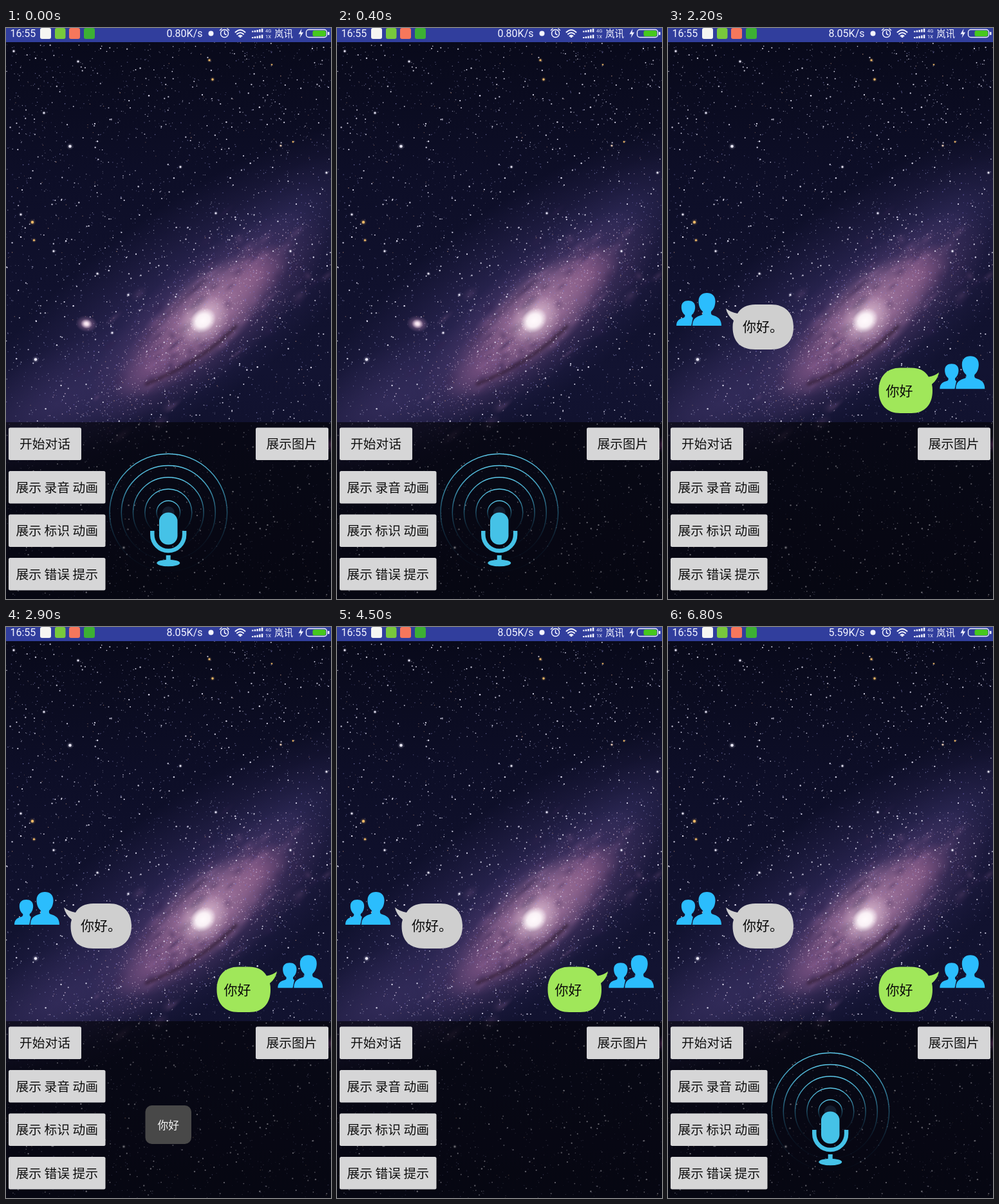
An HTML page with a canvas that plays this animation: 505x888 px, repeating every 8 s.

```html
<!DOCTYPE html>
<html lang="zh-CN">
<head>
<meta charset="utf-8">
<title>语音对话</title>
<style>
  html, body { margin: 0; width: 100%; height: 100%; overflow: hidden; background: #07081a; }
  canvas, svg { position: absolute; left: 0; top: 0; width: 505px; height: 888px; display: block; }
  text { font-family: Roboto, "Noto Sans CJK SC", "Noto Sans SC", "Noto Sans CJK", sans-serif; white-space: pre; }
  .cjk text { font-family: "Noto Sans CJK SC", "Noto Sans SC", "Noto Sans CJK", sans-serif; }
  .status text { fill: #f4f5ff; font-size: 16px; }
  .buttons rect { fill: #d6d6d7; }
  .buttons text { font-size: 19.8px; fill: #101010; text-anchor: middle; }
  .chat text { font-size: 21px; fill: #080808; }
  .people { fill: #2bbdfd; }
  .rings circle { fill: none; stroke: url(#ringFade); stroke-width: 1.5; }

  .mic, .chat, .speed { animation: 8s step-end infinite; }
  .mic { animation-name: mic; }
  .chat { animation-name: chat; }
  .s1 { animation-name: s1; }
  .s2 { animation-name: s2; }
  .s3 { animation-name: s3; }
  .toast { animation: toast 8s infinite; }

  @keyframes mic { 0% { opacity: 1 } 27.5% { opacity: 0 } 63.75%, 100% { opacity: 1 } }
  @keyframes chat { 0% { opacity: 0 } 27.5%, 100% { opacity: 1 } }
  @keyframes s1 { 0% { opacity: 1 } 17.5%, 100% { opacity: 0 } }
  @keyframes s2 { 0% { opacity: 0 } 17.5% { opacity: 1 } 70%, 100% { opacity: 0 } }
  @keyframes s3 { 0% { opacity: 0 } 70%, 100% { opacity: 1 } }
  @keyframes toast {
    0% { opacity: 0; animation-timing-function: step-end }
    28.75% { opacity: 0; animation-timing-function: steps(5, start) }
    35% { opacity: 1; animation-timing-function: step-end }
    51.25% { opacity: 1; animation-timing-function: steps(5, start) }
    57.5%, 100% { opacity: 0 }
  }
</style>
</head>
<body>
<canvas id="sky" width="505" height="888"></canvas>
<svg viewBox="0 0 505 888">
  <defs>
    <linearGradient id="ringFade" x1="0" y1="0" x2="0" y2="1">
      <stop offset="0" stop-color="#5cc8e8"/>
      <stop offset=".25" stop-color="#4cb8da" stop-opacity=".8"/>
      <stop offset=".55" stop-color="#3a9cc0" stop-opacity=".38"/>
      <stop offset=".8" stop-color="#2c7c9c" stop-opacity=".1"/>
      <stop offset="1" stop-color="#2c7c9c" stop-opacity=".03"/>
    </linearGradient>
    <clipPath id="behind"><path d="M0 400H46V446L39 450L36 464H0Z"/></clipPath>
    <path id="person" d="M38 463C38 452 44 449 52 446.5C54 445.5 54.5 444 54 441C49 437 47.5 430 47.5 425C47.5 416 53 412 60.5 412C68 412 73.5 416 73.5 425C73.5 430 72 437 67 441C66.5 444 67 445.5 69 446.5C77 449 83 452 83 463Z"/>
    <g id="pair" class="people">
      <g clip-path="url(#behind)"><use href="#person" transform="translate(31.5 463) scale(.82 .765) translate(-60.5 -463)"/></g>
      <use href="#person"/>
    </g>
  </defs>

  <g class="status">
    <rect width="505" height="22" fill="#313e9d"/>
    <text x="6.5" y="14">16:55</text>
    <rect x="53" y="0" width="17" height="17" rx="3" fill="#f6f6f2"/>
    <rect x="76" y="0" width="16.5" height="17" rx="3" fill="#78c83c"/>
    <rect x="98" y="0" width="17" height="17" rx="3" fill="#f6775c"/>
    <rect x="121" y="0" width="17" height="17" rx="3" fill="#3cb034"/>
    <g text-anchor="end">
      <text class="speed s1" x="305.5" y="14">0.80K/s</text>
      <text class="speed s2" x="305.5" y="14">8.05K/s</text>
      <text class="speed s3" x="305.5" y="14">5.59K/s</text>
    </g>
    <circle cx="318.5" cy="8.5" r="4" fill="#f4f5ff"/>
    <g fill="none" stroke="#f4f5ff" stroke-width="1.5" stroke-linecap="round">
      <circle cx="339.5" cy="8.5" r="6"/>
      <path d="M339.5 5V9L342 10.5M332.5 3.5L335 1.2M346.5 3.5L344 1.2"/>
      <path stroke-width="1.9" d="M356.5 6.5Q364 -.5 371.5 6.5M359 9.5Q364 5 369 9.5M361.5 12.5Q364 10.5 366.5 12.5"/>
    </g>
    <circle cx="364" cy="13.5" r="1.6" fill="#f4f5ff"/>
    <g id="bars" fill="#f4f5ff">
      <path d="M382 4.5h2.5v2h-2.5zM385.7 3.7h2.5v2.8h-2.5zM389.4 2.9h2.5v3.6h-2.5zM393.1 2h2.5v4.5h-2.5zM396.8 1h2.5v5.5h-2.5z"/>
    </g>
    <use href="#bars" y="9.5"/>
    <text x="403" y="6.8" style="font-size:7.5px">4G</text>
    <text x="403" y="16" style="font-size:7.5px">1X</text>
    <text x="417" y="14" style="font-size:14.5px">岚讯</text>
    <path d="M459.5 1L454.5 9.5H458L456.5 15.5L462 6.8H458.5Z" fill="#f4f5ff"/>
    <rect x="466.5" y="2.5" width="32" height="12" rx="4" fill="none" stroke="#f4f5ff" stroke-width="1.4"/>
    <rect x="476.5" y="4" width="20.5" height="9" rx="2.5" fill="#46c81e"/>
    <rect x="500" y="6" width="2.5" height="5" rx="1" fill="#f4f5ff"/>
  </g>

  <g class="mic">
    <g class="rings">
      <circle cx="252.3" cy="753.5" r="91.3"/>
      <circle cx="252.3" cy="753.5" r="73"/>
      <circle cx="252.3" cy="753.5" r="54.8"/>
      <circle cx="252.3" cy="753.5" r="36.5"/>
      <circle cx="252.3" cy="753.5" r="18.3"/>
    </g>
    <circle cx="252.3" cy="753.5" r="9.5" fill="#131d2e"/>
    <g fill="#45c2e7">
      <rect x="238" y="753.5" width="28.5" height="50" rx="14"/>
      <path d="M227.3 782V788A24.9 25 0 0 0 277.1 788V782" fill="none" stroke="#45c2e7" stroke-width="6.5"/>
      <rect x="248.7" y="820" width="7" height="11"/>
      <ellipse cx="252.3" cy="832" rx="18" ry="5.3"/>
    </g>
  </g>

  <g class="buttons cjk">
    <rect x="4" y="621.5" width="113" height="50.5" rx="2.5"/>
    <text x="60.5" y="654">开始对话</text>
    <rect x="388" y="621.5" width="113" height="50.5" rx="2.5"/>
    <text x="444" y="654">展示图片</text>
    <rect x="4" y="689" width="150.5" height="50.5" rx="2.5"/>
    <text x="79.2" y="722">展示 录音 动画</text>
    <rect x="4" y="756.5" width="150.5" height="50.5" rx="2.5"/>
    <text x="79.2" y="789">展示 标识 动画</text>
    <rect x="4" y="824" width="150.5" height="50.5" rx="2.5"/>
    <text x="79.2" y="857">展示 错误 提示</text>
  </g>

  <g class="chat cjk">
    <use href="#pair"/>
    <path fill="#cfcfcf" d="M90 436Q97 442 108 444Q116 430 136 430H160C182 430 195 443 195 465C195 487 182 500 160 500H136C113 500 100.5 488 100.5 465Q100.5 459 102 455Q92 447 90 436Z"/>
    <text x="116" y="471.5">你好。</text>
    <use href="#pair" x="409.3" y="98.3"/>
    <path fill="#a0e75a" d="M421 535.5Q415 541 405 542.5Q397 528.5 378 528.5H361C340 528.5 327.5 542 327.5 564C327.5 586 340 599 361 599H378C399 599 411 586 411 564Q411 558 410 554Q419 547 421 535.5Z"/>
    <text x="338.5" y="571.5">你好</text>
  </g>

  <g class="toast cjk">
    <rect x="216.5" y="744" width="71.5" height="60" rx="10" fill="#484848"/>
    <text x="252.3" y="780.5" text-anchor="middle" style="font-size:16.8px;fill:#f4f4f4">你好</text>
  </g>
</svg>
<script>
const W = 505, H = 888;
const ctx = document.getElementById('sky').getContext('2d');

let seed = 20177;
function rnd() {
  seed = (seed * 1664525 + 1013904223) % 4294967296;
  return seed / 4294967296;
}
const bell = () => rnd() + rnd() + rnd() - 1.5;

// Soft elliptical glow; rgb is "r,g,b", hold is the inner flat share.
function glow(x, y, rx, ry, deg, rgb, alpha, hold = 0) {
  ctx.save();
  ctx.translate(x, y);
  ctx.rotate(deg * Math.PI / 180);
  ctx.scale(rx, ry);
  const g = ctx.createRadialGradient(0, 0, 0, 0, 0, 1);
  g.addColorStop(0, `rgba(${rgb},${alpha})`);
  if (hold) g.addColorStop(hold, `rgba(${rgb},${alpha * 0.85})`);
  g.addColorStop(hold + (1 - hold) * 0.5, `rgba(${rgb},${alpha * 0.4})`);
  g.addColorStop(1, `rgba(${rgb},0)`);
  ctx.fillStyle = g;
  ctx.fillRect(-1, -1, 2, 2);
  ctx.restore();
}

function dot(x, y, r, rgb, alpha) {
  ctx.fillStyle = `rgba(${rgb},${alpha})`;
  ctx.beginPath();
  ctx.arc(x, y, r, 0, 7);
  ctx.fill();
}

function star(x, y, r, rgb = '240,238,255') {
  glow(x, y, r * 2.4, r * 2.4, 0, rgb, 0.5);
  dot(x, y, r, rgb, 0.95);
}

// Scatter n shapes around the disc, long axis up to the right.
function scatter(n, long, wide, draw) {
  for (let i = 0; i < n; i++) {
    const u = bell() * long, v = bell() * wide;
    draw(306 + u * 0.77 + v * 0.64, 450 - u * 0.64 + v * 0.77);
  }
}

const base = ctx.createLinearGradient(0, 0, 0, H);
base.addColorStop(0, '#080919');
base.addColorStop(0.25, '#0d0e27');
base.addColorStop(0.6, '#121331');
base.addColorStop(1, '#0e0f28');
ctx.fillStyle = base;
ctx.fillRect(0, 0, W, H);

glow(285, 430, 440, 150, -36, '64,54,112', 0.62, 0.25);
glow(80, 585, 220, 85, -25, '64,54,106', 0.55, 0.2);
glow(440, 295, 150, 66, -35, '66,60,118', 0.3);
glow(312, 450, 235, 88, -41, '112,76,126', 0.6, 0.3);
glow(303, 457, 176, 58, -41, '148,98,142', 0.6, 0.5);
glow(388, 382, 62, 36, -38, '160,104,148', 0.5, 0.2);
glow(222, 530, 66, 30, -38, '140,92,142', 0.35, 0.2);
glow(314, 440, 112, 62, -43, '205,160,188', 0.6);
glow(507, 648, 14, 14, 0, '170,90,170', 0.9);

// Mottled texture of the disc
scatter(110, 190, 85, (x, y) => {
  const dark = rnd() < 0.45;
  glow(x, y, 8 + rnd() * 16, 4 + rnd() * 7, -40, dark ? '50,34,78' : '165,115,165', dark ? 0.32 : 0.2);
});

// Dust lanes below the core
ctx.save();
ctx.lineCap = 'round';
function lane(width, blur, color, x, y, cx, cy, ex, ey) {
  ctx.filter = `blur(${blur}px)`;
  ctx.lineWidth = width;
  ctx.strokeStyle = color;
  ctx.beginPath();
  ctx.moveTo(x, y);
  ctx.quadraticCurveTo(cx, cy, ex, ey);
  ctx.stroke();
}
lane(5, 2, 'rgba(42,24,44,.65)', 218, 554, 305, 518, 357, 464);
lane(4, 2.5, 'rgba(62,40,76,.35)', 205, 496, 250, 440, 310, 392);
ctx.restore();

// Fine specks over the whole sky, then along the disc, then brighter stars
for (let i = 0; i < 3600; i++) {
  const a = rnd();
  const rgb = a < 0.5 ? '150,150,210' : a < 0.95 ? '220,220,245' : '225,175,145';
  dot(rnd() * W, 22 + rnd() * (H - 22), 0.45 + rnd() * 0.4, rgb, 0.2 + rnd() * 0.55);
}
scatter(1500, 250, 85, (x, y) => {
  const rgb = rnd() < 0.6 ? '235,205,230' : '130,120,205';
  dot(x, y, 0.45 + rnd() * 0.45, rgb, 0.25 + rnd() * 0.5);
});
for (let i = 0; i < 620; i++) {
  dot(rnd() * W, 24 + rnd() * (H - 24), 0.75 + rnd() * 0.5, '234,232,250', 0.65 + rnd() * 0.35);
}

// Core and companion
glow(307, 454, 46, 34, -40, '250,225,238', 0.85);
glow(306, 455, 22, 18, -40, '255,250,252', 1, 0.5);
glow(125, 460, 17, 13, 10, '215,155,200', 0.8);
glow(125, 460, 9, 7.5, 10, '255,240,248', 1, 0.3);

const gold = '245,190,105';
star(41, 302, 2.2, gold);
star(43.5, 330, 1.6, gold);
star(316, 50, 1.6, gold);
star(321, 80, 1.7, gold);
star(413, 57, 1.1, gold);
star(446, 177, 1.2, gold);
star(427, 183, 1.3, '245,215,190');
star(99.5, 184, 2.3);
star(46, 515.5, 2.3);
[[442, 347], [326, 288], [271, 216], [190, 415], [59, 132], [12, 36], [498, 225],
 [23, 290], [142, 382], [74, 347], [165, 474], [112, 52], [183, 808]]
  .forEach(([x, y]) => star(x, y, 1.5));

ctx.fillStyle = 'rgba(0,0,0,.55)';
ctx.fillRect(0, 613, W, H - 613);
</script>
</body>
</html>
```
